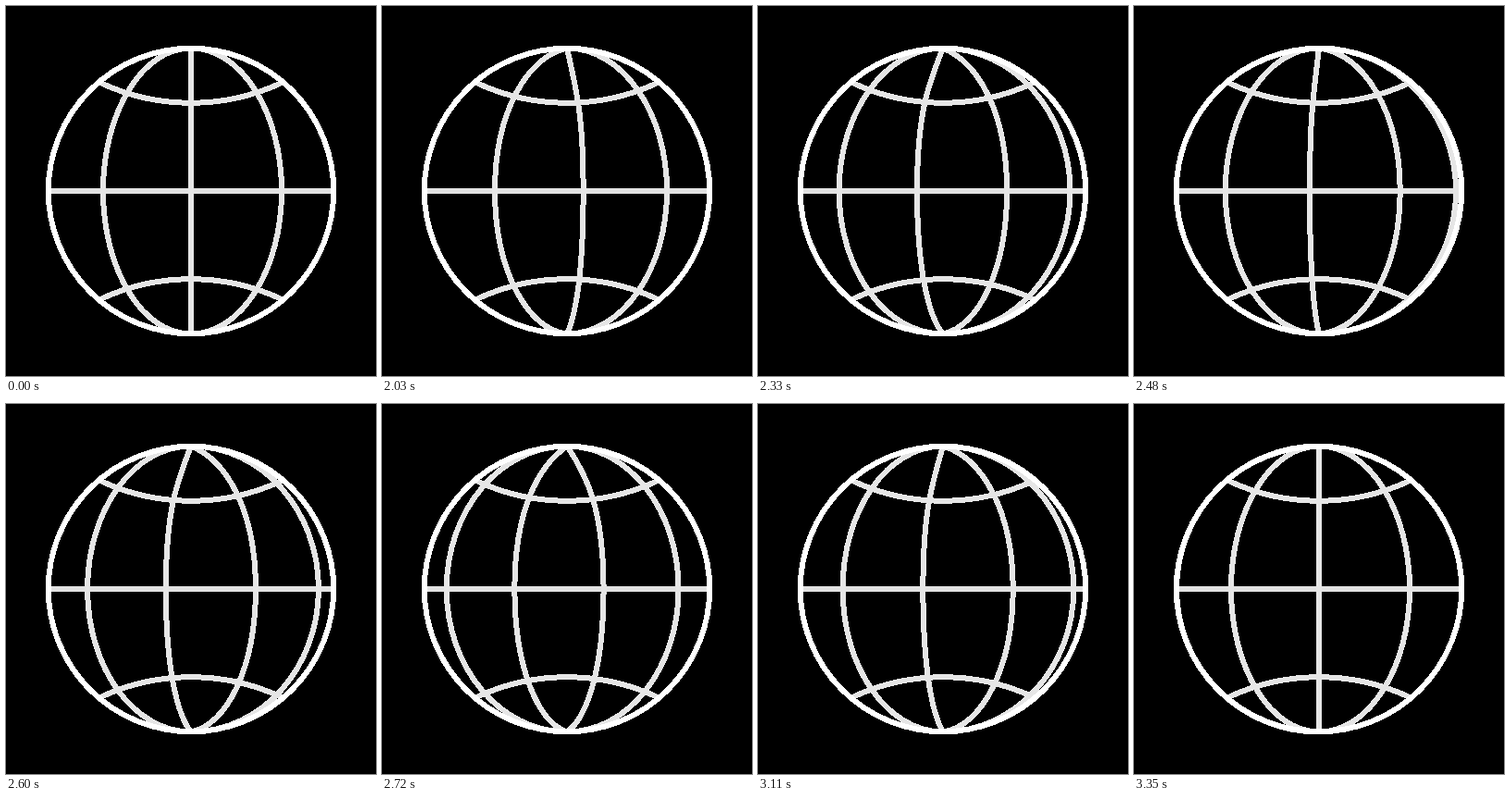
Recreate the animation shown at these times as an HTML page. Size 400x400 px, loop 3.44 s.

```html
<!DOCTYPE html>
<html lang="en">
<head>
<meta charset="utf-8">
<title>Spinning globe</title>
<style>
  html, body { margin: 0; width: 100%; height: 100%; overflow: hidden; background: #000; }
  svg { display: block; width: 100vw; height: 100vh; }
</style>
</head>
<body>
<svg viewBox="0 0 400 400" fill="none" stroke="#e6e6e6" stroke-width="6" shape-rendering="crispEdges">
  <path d="M46 200H354" stroke="#e2e2e2"/>
  <path d="M101 82.5A231 231 0 0 0 299 82.5M101 317.5A231 231 0 0 1 299 317.5"/>
  <g id="meridians"></g>
  <circle cx="200" cy="200" r="154.2" stroke="#fff"/>
</svg>
<script>
const LOOP = 3440, HOLD = 2000, STEP = 30, STEPS = 45, TURNS = 7;
const C = 200, RY = 154.5, KAPPA = 0.5523;
// Horizontal offsets a meridian visits from the left rim to the right rim
const SLOTS = [-154, -95, 0, 98, 154];
// Vertical reach of the pole handles when the meridian is straight
const TOP_PULL = 0.35 * RY, BOTTOM_PULL = 0.17 * RY;

const group = document.getElementById('meridians');
const lines = SLOTS.slice(1).map(() =>
  group.appendChild(document.createElementNS('http://www.w3.org/2000/svg', 'path')));

const lerp = (a, b, f) => a + (b - a) * f;
const cubic = (a, b, s) => 3 * a * s * (1 - s) ** 2 + 3 * b * s * s * (1 - s) + s ** 3;

// Linear start, soft landing
function ease(x) {
  if (x <= 0 || x >= 1) return x <= 0 ? 0 : 1;
  let lo = 0, hi = 1;
  for (let i = 0; i < 30; i++) {
    const mid = (lo + hi) / 2;
    if (cubic(0.163, 0.46, mid) < x) lo = mid; else hi = mid;
  }
  return cubic(0.167, 0.995, lo);
}

// Blends a straight pole-to-pole line (straight = 1) into a half ellipse (straight = 0)
function meridian(w, straight) {
  const top = C - RY, bottom = C + RY, x = C + w, bend = C + w * KAPPA, arm = RY * KAPPA;
  return `M${C} ${top}C${bend} ${top + TOP_PULL * straight} ${x} ${C - arm} ${x} ${C}` +
    `C${x} ${C + arm} ${bend} ${bottom - BOTTOM_PULL * straight} ${C} ${bottom}`;
}

function draw(time) {
  const t = time % LOOP;
  const step = Math.min(STEPS, Math.max(0, Math.floor((t - HOLD) / STEP)));
  const p = TURNS * ease(step / STEPS);
  const f = p % 1;
  lines.forEach((line, k) => {
    const a = SLOTS[k], b = SLOTS[k + 1];
    const straight = a === 0 ? 1 - f : b === 0 ? f : 0;
    line.setAttribute('d', meridian(lerp(a, b, f), straight));
  });
  // The entering meridian shows up just after the spin begins
  lines[0].style.visibility = p < 0.25 ? 'hidden' : 'visible';
}

let start;
function tick(now) {
  if (start === undefined) start = now;
  draw(now - start);
  requestAnimationFrame(tick);
}
draw(0);
requestAnimationFrame(tick);
</script>
</body>
</html>
```
